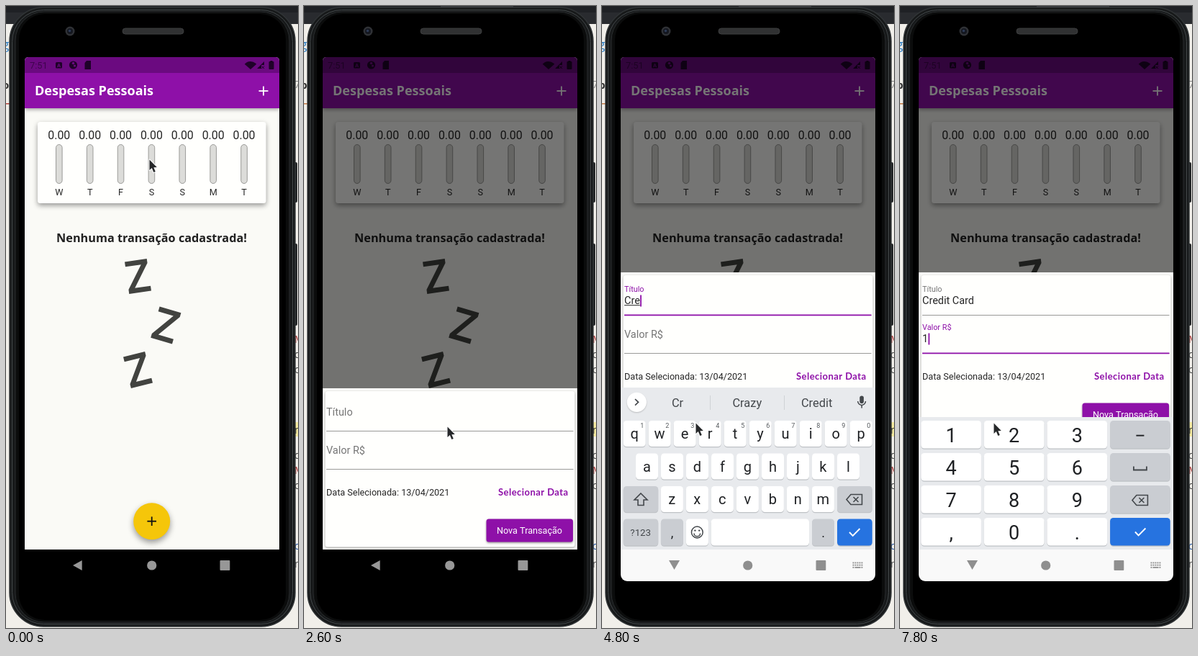
An HTML page with a canvas that plays this animation: 406x864 px, repeating every 8 s.

```html
<!DOCTYPE html>
<html lang="pt">
<head>
<meta charset="utf-8">
<title>Despesas Pessoais</title>
<style>
html, body { margin: 0; width: 100%; height: 100%; overflow: hidden; background: #f1efea; }
canvas { display: block; width: 406px; height: 864px; }
</style>
</head>
<body>
<canvas id="stage" width="406" height="864"></canvas>
<script>
const c = document.getElementById('stage').getContext('2d');
const LOOP = 8000, TICK = 100;
const PURPLE = '#8e10a8', GREY = '#8f8f8f', LIFT = 161;
const ROBOTO = 'Roboto, sans-serif', OPEN = '"Open Sans", sans-serif';

// Pointer waypoints: time, x, y
const PATH = [
  [0, 199, 213], [400, 199, 213], [500, 196, 320], [600, 187, 470], [700, 188, 549],
  [900, 188, 549], [1000, 190, 585], [1100, 199, 670], [1200, 209, 760], [1300, 212, 804],
  [1400, 205, 760], [1500, 198, 725], [2100, 198, 725], [2200, 197, 725], [2300, 197, 725],
  [2400, 199, 679], [2500, 199, 679], [2600, 199, 584], [3100, 130, 580], [3200, 130, 580],
  [3300, 130, 579]
];

// Typing: time, text, composing range, suggestions
const TYPING = [
  [0, '', 0, 0, ''],
  [4700, 'Cr', 0, 2, 'C|Can|Come'],
  [4800, 'Cre', 0, 3, 'Cr|Crazy|Credit'],
  [5000, 'Cred', 0, 4, 'Cre|Credit|Credits'],
  [5200, 'Credi', 0, 5, 'Cred|Credit|Creditor'],
  [5400, 'Credit', 0, 5, 'Cred|Credit|Creditor'],
  [5600, 'Credit', 0, 6, 'Credit|Credits|Creditor'],
  [5900, 'Credit ', 0, 6, 'card|cards|report'],
  [6100, 'Credit ', 0, 0, 'card|cards|report'],
  [6300, 'Credit Ca', 7, 9, 'C|Card|Cards'],
  [6400, 'Credit Car', 7, 9, 'C|Card|Cards'],
  [6700, 'Credit Car', 7, 10, 'Car|Card|Care'],
  [6900, 'Credit Card', 7, 11, 'Card|Cards|Care'],
  [7000, 'Credit Card', 0, 0, '']
];

// Keyboard distance below its resting place
const SLIDE = [[0, 270], [4000, 270], [4100, 267], [4200, 257], [4300, 120], [4400, 22], [4500, 0]];

const clamp = v => Math.max(0, Math.min(1, v));
const mix = (a, b, p) => a + (b - a) * p;
const ramp = (t, a, b) => clamp((t - a) / (b - a));

function sample(keys, t, i) {
  let k = keys.length - 1;
  while (keys[k][0] > t) k--;
  const a = keys[k], b = keys[k + 1];
  return b ? mix(a[i], b[i], (t - a[0]) / (b[0] - a[0])) : a[i];
}

function rect(x, y, w, h, fill) {
  c.fillStyle = fill;
  c.fillRect(x, y, w, h);
}

function box(x, y, w, h, r, fill, stroke, lw = 1) {
  c.beginPath();
  c.roundRect(x, y, w, h, r);
  if (fill) { c.fillStyle = fill; c.fill(); }
  if (stroke) { c.strokeStyle = stroke; c.lineWidth = lw; c.stroke(); }
}

function disc(x, y, r, fill) {
  c.beginPath();
  c.arc(x, y, r, 0, 7);
  c.fillStyle = fill;
  c.fill();
}

function poly(points, fill, stroke, lw = 1, open = false) {
  c.beginPath();
  points.forEach(p => c.lineTo(p[0], p[1]));
  if (!open) c.closePath();
  if (stroke) { c.strokeStyle = stroke; c.lineWidth = lw; c.stroke(); }
  if (fill) { c.fillStyle = fill; c.fill(); }
}

const line = (points, color, lw) => poly(points, null, color, lw, true);

function text(s, x, y, size, fill, align = 'left', font = ROBOTO, weight = 400) {
  c.font = `${weight} ${size}px ${font}`;
  c.textAlign = align;
  c.fillStyle = fill;
  c.fillText(s, x, y);
  return c.measureText(s).width;
}

function shadow(blur, dy, alpha, draw) {
  c.save();
  c.shadowColor = `rgba(0,0,0,${alpha})`;
  c.shadowBlur = blur;
  c.shadowOffsetY = dy;
  draw();
  c.restore();
}

function plus(x, y, r, color) {
  rect(x - r, y - 0.9, 2 * r, 1.8, color);
  rect(x - 0.9, y - r, 1.8, 2 * r, color);
}

function backdrop(t) {
  rect(0, 0, 406, 864, '#f1efea');
  rect(0, 0, 406, 25, '#292b2f');
  rect(0, 0, 406, 9, '#1f2125');
  if (t >= 1800) rect(190, 0, 101, 9, '#3a3c41');
  text('g', -6, 60, 19, '#2f7fc4', 'left', OPEN);
  text(t < 1800 ? 'o' : 'p', -5, 115, 15, '#333', 'left', OPEN, 700);
  rect(0, 135, 6, 1.5, t < 1800 ? '#b5403a' : '#c77a45');
  rect(400, 578, 6, 20, '#f3e9a0');
  const scraps = [['7', 114, '#888'], ['M', 468, '#a33'], ['d', 489, '#444'], ['o', 510, '#444'],
    ['n', 594, '#222'], ['d', 629, '#444'], ['M', 650, '#a33'], ['o', 671, '#444'],
    ['c', 755, '#2456a5'], ['n', 780, '#444']];
  scraps.forEach(([s, y, color]) => text(s, 401, y, 14, color, 'left', OPEN));
}

function phone() {
  box(400, 217, 5, 56, 2, '#202224');
  box(400, 330, 5, 114, 2, '#202224');
  box(5, 2, 397, 860, 47, '#17191a', '#303436', 1.5);
  box(8.5, 5.5, 390, 853, 44, null, '#43484a', 1);
  box(13, 8, 381, 848, 40, '#0b0c0c', '#2a2d2f', 1);
  box(18, 11, 371, 842, 36, '#000');
  disc(89, 35, 6.5, '#303236');
  disc(89, 35, 4, '#14171f');
  disc(88.5, 34.5, 1.8, '#2d3a55');
  box(162, 31, 85, 8, 4, '#303132', '#3d3e3f');
}

function statusIcons() {
  const ink = 'rgba(15,0,22,.82)';
  text('7:51', 33, 86.5, 12.8, 'rgba(25,0,35,.55)');
  box(69, 78, 9, 8.5, 1.5, ink);
  text('A', 73.5, 85.3, 7.5, '#6b0a80', 'center', ROBOTO, 700);
  disc(93.5, 82, 5.6, ink);
  disc(93.5, 79.5, 1.8, '#6b0a80');
  disc(95.5, 83, 1.6, '#6b0a80');
  poly([[112, 76], [118, 76], [118, 88], [109.5, 88], [109.5, 79]], ink);
  c.beginPath();
  c.moveTo(340, 88);
  c.arc(340, 88, 11, -Math.PI * 0.77, -Math.PI * 0.23);
  c.fillStyle = ink;
  c.fill();
  poly([[349, 87], [359, 77], [359, 82], [355, 82], [355, 87]], ink);
  line([[355.5, 83.5], [359, 87]], ink, 1);
  line([[359, 83.5], [355.5, 87]], ink, 1);
  rect(367.5, 76, 3, 2, ink);
  box(365.5, 77, 7, 11, 1, ink);
}

function zed(x, y, deg) {
  const w = 15.5, h = 22.5;
  c.save();
  c.translate(x, y);
  c.rotate(deg * Math.PI / 180);
  poly([[-w, -h], [w, -h], [w, -h + 6], [-w + 9, h - 7], [w, h - 7], [w, h],
    [-w, h], [-w, h - 6], [w - 9, -h + 7], [-w, -h + 7]], '#424340');
  c.restore();
}

function home() {
  rect(26, 71, 354, 684, '#fafaf6');
  shadow(5, 2, 0.35, () => rect(26, 93, 354, 49, PURPLE));
  rect(26, 71, 354, 22, '#6b0a80');
  statusIcons();
  text('Despesas Pessoais', 40, 124.3, 18.06, '#fff', 'left', OPEN, 700);
  plus(358, 118, 6.5, '#fff');

  shadow(7, 3, 0.4, () => box(44, 161, 317.5, 113, 3.5, '#fffffd'));
  [...'WTFSSMT'].forEach((day, i) => {
    const x = 73.8 + i * 42.87;
    text('0.00', x, 185, 15.9, '#262626', 'center');
    box(x - 4.3, 192.5, 8.6, 54, 4.3, '#dcdcd9', '#9b9b98');
    text(day, x, 262.6, 12.64, '#262626', 'center');
  });

  text('Nenhuma transação cadastrada!', 202.5, 327.5, 16.25, '#212121', 'center', OPEN, 700);
  zed(183.5, 375.5, -8);
  zed(222.3, 443.5, 16);
  zed(183.5, 505.5, -14);
  shadow(8, 4, 0.4, () => disc(202.7, 715.7, 25.5, '#f5c60a'));
  plus(202.7, 715.7, 6.3, '#111');
}

// base: baseline of the resting label
function field(label, base, f) {
  const color = f.focus ? PURPLE : '#757575';
  text(label, 31, base - 11 * f.raise, mix(14.45, 10.84, f.raise), color);
  rect(31, base + 21, 343.5, 1, '#9a9a98');
  if (f.focus) {
    const half = 171.75 * f.focus;
    rect(202.75 - half, base + 20.5, 2 * half, 1.8, PURPLE);
  }
  const w = text(f.text, 31, base + 6, 14.45, '#262626');
  if (f.to > f.from) {
    const at = n => 31 + c.measureText(f.text.slice(0, n)).width;
    rect(at(f.from), base + 7.2, at(f.to) - at(f.from), 1, '#262626');
  }
  if (f.caret) rect(31.3 + w, base - 6.5, 1.8, 16, PURPLE);
}

function sheet(lift, title, value) {
  c.save();
  c.translate(0, -lift);
  rect(26, 531, 354, 224 + lift, '#fbfbf8');
  shadow(3, 1, 0.4, () => box(29.5, 535, 347, 216.5, 3.5, '#fffffd'));
  field('Título', 569, title);
  field('Valor R$', 622, value);
  text('Data Selecionada: 13/04/2021', 31, 679.5, 12.64, '#262626');
  c.letterSpacing = '0.45px';
  text('Selecionar Data', 270, 679.5, 13, PURPLE, 'left', 'Lato, sans-serif', 700);
  c.letterSpacing = '0px';
  shadow(3, 1.5, 0.4, () => box(253.5, 712.5, 120.5, 32, 3.5, PURPLE));
  text('Nova Transação', 313.5, 733, 12.64, '#fff', 'center');
  c.restore();
}

function key(x, y, w, h, fill = '#fff') {
  box(x, y + 1.2, w, h, 4.5, '#bfc2c6');
  box(x, y, w, h, 4.5, fill);
}

const MUTED = '#cacdd2', BLUE = '#2673e0', INK = '#1f2124', SOFT = '#43474b';

function erase(x, y) {
  poly([[x - 11, y], [x - 5, y - 7], [x + 10.5, y - 7], [x + 10.5, y + 7], [x - 5, y + 7]], null, SOFT, 1.6);
  line([[x - 1.5, y - 3.5], [x + 5.5, y + 3.5]], SOFT, 1.6);
  line([[x + 5.5, y - 3.5], [x - 1.5, y + 3.5]], SOFT, 1.6);
}

const tick = (x, y) => line([[x - 7, y], [x - 2.3, y + 5], [x + 7.5, y - 5]], '#fff', 1.9);

function strip(words) {
  shadow(2, 1, 0.2, () => disc(48.3, 550.3, 13.6, '#fff'));
  line([[46, 546], [50.5, 550.3], [46, 554.6]], SOFT, 1.7);
  words.split('|').forEach((word, i) => text(word, 105 + i * 96.8, 556.8, 16.4, SOFT, 'center'));
  rect(150, 541, 1, 20, '#cfd2d6');
  rect(253, 541, 1, 20, '#cfd2d6');
  box(358.3, 541.5, 5.6, 10.5, 2.8, SOFT);
  c.beginPath();
  c.arc(361.1, 549, 5.4, 0, Math.PI);
  c.strokeStyle = SOFT;
  c.lineWidth = 1.5;
  c.stroke();
  rect(360.4, 554, 1.5, 4.5, SOFT);
}

function letters(words) {
  rect(26, 530, 354, 225, '#e8eaed');
  strip(words);
  const rows = [['qwertyuiop', 29.7, 576], ['asdfghjkl', 47, 621.5], ['zxcvbnm', 81.9, 667]];
  rows.forEach(([chars, x0, y], row) => [...chars].forEach((ch, i) => {
    const x = x0 + i * 35;
    key(x, y, 31, 36);
    text(ch, x + 15.4, y + 25, 20, INK, 'center');
    if (!row) text((i + 1) % 10, x + 26, y + 10.2, 9, '#55595d', 'center');
  }));
  key(29.7, 667, 48.5, 36, MUTED);
  poly([[54, 677], [63, 686], [58, 686], [58, 693.5], [50, 693.5], [50, 686], [45, 686]], null, SOFT, 1.6);
  key(327, 667, 48.7, 36, MUTED);
  erase(351, 685.5);

  key(29.7, 712.5, 48.5, 37, MUTED);
  text('?123', 53.7, 736, 13.3, SOFT, 'center');
  key(81.9, 712.5, 31, 37, MUTED);
  text(',', 97.5, 738, 18, INK, 'center');
  key(116.9, 712.5, 31, 37);
  c.beginPath();
  c.arc(132.3, 731, 7.9, 0, 7);
  c.moveTo(136.6, 732.5);
  c.arc(132.3, 732.5, 4.3, 0, Math.PI);
  c.strokeStyle = SOFT;
  c.lineWidth = 1.5;
  c.stroke();
  disc(129.4, 728.6, 1.2, SOFT);
  disc(135.2, 728.6, 1.2, SOFT);
  key(151.7, 712.5, 136.3, 37);
  key(292, 712.5, 31, 37, MUTED);
  text('.', 307.5, 738, 18, INK, 'center');
  key(327, 712.5, 48.7, 37, BLUE);
  tick(351, 731);
}

function digits() {
  rect(26, 571, 354, 184, '#e8eaed');
  ['123-', '456_', '789<', ',0.!'].forEach((row, j) => [...row].forEach((ch, i) => {
    const x = 29.3 + i * 87.6, y = 576 + j * 45, mx = x + 41.8, my = y + 19.5;
    key(x, y, 83.6, 38.5, i < 3 ? '#fff' : j < 3 ? MUTED : BLUE);
    if (i < 3) text(ch, mx, y + 30, 27, INK, 'center');
    else if (ch === '-') rect(mx - 5.5, my + 0.2, 11, 1.9, INK);
    else if (ch === '_') line([[mx - 9, my - 1], [mx - 9, my + 4], [mx + 9, my + 4], [mx + 9, my - 1]], SOFT, 1.8);
    else if (ch === '<') erase(mx, my + 1);
    else tick(mx, my);
  }));
}

function keyboard(t, off, words) {
  c.save();
  c.beginPath();
  c.roundRect(26, 500, 354, 299, [0, 0, 9, 9]);
  c.clip();
  c.translate(0, off);
  rect(26, 755, 354, 44, '#f9f9f9');
  if (t < 7000) letters(words);
  else digits();
  c.restore();
}

function nav(t, off) {
  // During the slide the bar stays dark above the rising panel
  if (off > 200) rect(26, 755, 354, Math.min(44, off - 225), '#000');
  if (off) poly([[93, 777], [105.7, 770], [105.7, 784]], '#979797');
  else poly([[93, 770], [108, 770], [100.5, 783]], GREY);
  disc(202.7, 777, 6.6, off ? '#979797' : GREY);
  box(297.5, 770, 13.8, 14, 1, off ? '#979797' : GREY);
  if (t < 3600) return;
  for (let i = 0; i < 15; i++) {
    const row = Math.floor(i / 5);
    if (row < 2 || i % 5 === 0 || i % 5 === 4) rect(348.5 + (i % 5) * 3, 772.5 + row * 3.2, 1.9, 1.9, GREY);
  }
  rect(351.5, 779, 8, 1.8, GREY);
}

function pointer(x, y) {
  c.save();
  c.translate(x, y);
  c.lineJoin = 'round';
  poly([[0.5, 0.5], [0.5, 15], [3.8, 12], [6.3, 18], [8.8, 17], [6.3, 11.2], [10.8, 11]], '#26282a', '#fff', 2);
  c.restore();
}

function frame(t) {
  backdrop(t);
  phone();
  c.save();
  c.beginPath();
  c.roundRect(26, 71, 354, 728, [5, 5, 0, 0]);
  c.clip();
  home();
  const off = sample(SLIDE, t, 1);
  if (t >= 2600) {
    rect(26, 71, 354, 684, 'rgba(0,0,0,.54)');
    const [, typed, from, to] = TYPING.findLast(s => s[0] <= t);
    const inValue = t >= 7000;
    const first = ramp(t, 3500, 3800), second = ramp(t, 6900, 7100);
    sheet(t >= 4400 ? LIFT : 0,
      { raise: first, focus: inValue ? 0 : first, text: typed, from, to, caret: t >= 4400 && !inValue },
      { raise: second, focus: second, text: t >= 7800 ? '1' : '', caret: inValue && (t < 7400 || t >= 7800) });
  }
  rect(26, 755, 354, 44, '#000');
  if (off < 270) keyboard(t, off, TYPING.findLast(s => s[0] <= t)[4]);
  nav(t, off);
  c.restore();
  pointer(sample(PATH, t, 1), sample(PATH, t, 2));
}

function loop() {
  const t = performance.now() % LOOP;
  frame(Math.floor(t / TICK) * TICK);
  requestAnimationFrame(loop);
}
loop();
</script>
</body>
</html>
```
